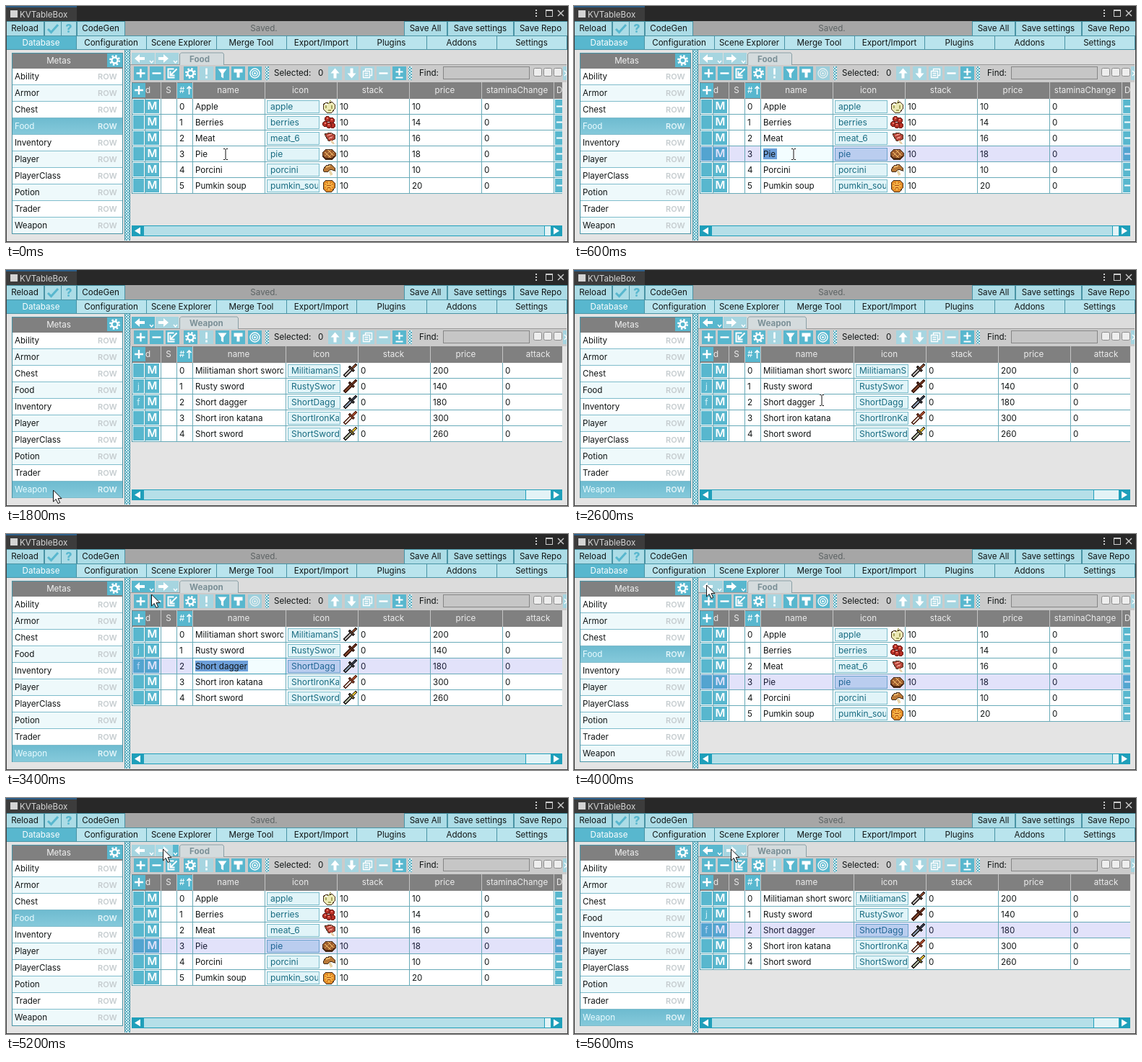
Recreate the animation shown at these times as an HTML page. Size 778 by 328 pixels, loop 5.8 s.

```html
<!DOCTYPE html>
<html lang="en">
<head>
<meta charset="utf-8">
<title>Table editor</title>
<style>
html, body { margin: 0; width: 100%; height: 100%; overflow: hidden; background: #e4e4e4; }
svg { display: block; }
text { font-family: Inter, "Open Sans", sans-serif; font-size: 11.6px; white-space: pre; }
.food, .weapon, .pie, .dagger, .pieEdit, .daggerEdit, .fade, .next, .hover, .beam, .arrow, #cursor {
  animation: 5800ms step-end infinite;
}
.food { animation-name: food; }
.weapon { animation-name: weapon; }
.pie { animation-name: pie; }
.dagger { animation-name: dagger; }
.pieEdit { animation-name: pieEdit; }
.daggerEdit { animation-name: daggerEdit; }
.fade { animation-name: fade; }
.next { animation-name: next; }
.hover { animation-name: hover; }
.beam { animation-name: beam; }
.arrow { animation-name: arrow; }
#cursor { animation-name: move; }
@keyframes food { 0%, 65.51% { opacity: 1 } 27.58%, 93.1%, 100% { opacity: 0 } }
@keyframes weapon { 0%, 65.51% { opacity: 0 } 27.58%, 93.1%, 100% { opacity: 1 } }
@keyframes pie { 0% { opacity: 0 } 6.89%, 100% { opacity: 1 } }
@keyframes dagger { 0% { opacity: 0 } 48.27%, 100% { opacity: 1 } }
@keyframes pieEdit { 0%, 27.58%, 100% { opacity: 0 } 6.89% { opacity: 1 } }
@keyframes daggerEdit { 0%, 65.51%, 100% { opacity: 0 } 48.27% { opacity: 1 } }
@keyframes fade { 0%, 27.58%, 65.51%, 100% { opacity: 0 } 6.89%, 48.27% { opacity: .55 } }
@keyframes next { 0%, 93.1%, 100% { opacity: 0 } 65.51% { opacity: 1 } }
@keyframes hover { 0%, 93.1%, 100% { opacity: 0 } 86.2% { opacity: 1 } }
@keyframes beam { 0%, 41.37% { opacity: 1 } 13.79%, 55.17%, 100% { opacity: 0 } }
@keyframes arrow { 0%, 41.37% { opacity: 0 } 13.79%, 55.17%, 100% { opacity: 1 } }
@keyframes move {
  0% { transform: translate(304px, 206px) }
  10.34% { transform: translate(304px, 206px); animation-timing-function: steps(4) }
  24.13% { transform: translate(65px, 306px) }
  31.03% { transform: translate(65px, 306px); animation-timing-function: steps(4) }
  44.82% { transform: translate(343px, 181px) }
  51.72% { transform: translate(343px, 181px); animation-timing-function: steps(2) }
  58.62% { transform: translate(201px, 84px) }
  62.06% { transform: translate(183px, 71px) }
  75.86% { transform: translate(183px, 71px); animation-timing-function: steps(3) }
  86.2%, 100% { transform: translate(217px, 71px) }
}
</style>
</head>
<body>
<svg id="stage" width="778" height="328" viewBox="0 0 778 328">
  <defs>
    <linearGradient id="chosen" x2="0" y2="1"><stop stop-color="#6ebbd0"/><stop offset="1" stop-color="#86cadb"/></linearGradient>
    <pattern id="dots" width="4" height="4" patternUnits="userSpaceOnUse">
      <path fill="#55aabd" d="M0 0h4v4h-4z"/><path fill="#d9f3f8" d="M0 0h2v2h-2zM2 2h2v2h-2z"/>
    </pattern>
  </defs>
</svg>
<script>
const TEAL = '#58b7ce', PALE = '#b9e4ed', DIM = '#a6d5e0', DEEP = '#1f9fba', EDGE = '#4a94a5';
const GRAY = '#808080', SHELL = '#3c3c3c', INK = '#101414';

const rect = (x, y, w, h, fill, stroke) => stroke
  ? `<rect x="${x + .5}" y="${y + .5}" width="${w - 1}" height="${h - 1}" fill="${fill}" stroke="${stroke}"/>`
  : `<rect x="${x}" y="${y}" width="${w}" height="${h}" fill="${fill}"/>`;
const text = (x, y, s, fill = INK, more = '') => `<text x="${x}" y="${y}" fill="${fill}" ${more}>${s}</text>`;
const mid = (x, y, s, fill, more = '') => text(x, y, s, fill, `text-anchor="middle" ${more}`);
const line = (d, color, w = 1) => `<path d="${d}" fill="none" stroke="${color}" stroke-width="${w}"/>`;
const group = (cls, s) => `<g class="${cls}">${s}</g>`;
const at = (x, y, s) => `<g transform="translate(${x} ${y})">${s}</g>`;
const clip = (x, y, w, h, s) => `<svg x="${x}" y="${y}" width="${w}" height="${h}" viewBox="${x} ${y} ${w} ${h}">${s}</svg>`;

// Glyphs are drawn around the centre of a button
const glyph = {
  plus: line('M-6 0H6M0-6V6', '#fff', 2.4),
  minus: line('M-6 0H6', '#fff', 2.4),
  edit: line('M3 6H-6V-6H2M6-6L-2 2M-3-3V3H3', '#fff', 2),
  gear: '<circle r="4" fill="none" stroke="#fff" stroke-width="2.4"/><circle r="6.2" fill="none" stroke="#fff" stroke-width="2.6" stroke-dasharray="2.4 2.47"/>',
  bang: line('M0-7V2M0 4V7', '#fff', 2.6),
  funnel: '<path d="M-6-6H6L1.6 0V7L-1.6 5V0Z" fill="#fff"/>',
  tee: '<path d="M-6-6H6V-1H2V6H-2V-1H-6Z" fill="#fff"/>',
  target: '<g fill="none" stroke="#fff" stroke-width="1.4"><circle r="6.5"/><circle r="3.6"/><circle r=".8"/></g>',
  up: '<path d="M0-7L6 0H2V7H-2V0H-6Z" fill="#fff"/>',
  down: '<path d="M0 7L6 0H2V-7H-2V0H-6Z" fill="#fff"/>',
  copy: line('M-3-3V-6H6V3H3M-6-3H3V6H-6ZM-4 0H1M-4 3H1', '#fff', 1.3),
  both: line('M-5-2H5M0-7V3M-5 6H5', '#fff', 2.2)
};
const button = (x, name, fill = TEAL, y = 84, w = 19) =>
  rect(x, y, w, 19, fill) + at(x + w / 2, y + 9.5, glyph[name]);

function frame() {
  let s = rect(0, 0, 778, 328, '#e4e4e4') + rect(0, 0, 778, 21, '#282828');
  s += rect(0, 0, 98, 21, SHELL) + rect(0, 0, 98, 2, '#2c5d87');
  s += rect(6, 6, 10, 10, '#d4d4d4') + text(19, 16, 'KVTableBox', '#d6d6d6');
  for (const y of [5, 9, 13]) s += rect(733, y, 2, 2, '#ccc');
  s += rect(747, 6, 10, 9, 'none', '#ccc') + rect(747, 5, 10, 2, '#ccc') + line('M764 6L772 14M772 6L764 14', '#ccc', 1.4);
  s += rect(0, 21, 778, 20, '#a6a6a6') + mid(357, 35, 'Saved.', '#5c6263');
  for (const [x, w, label] of [[0, 53, 'Reload'], [53, 24, ''], [76, 22, ''], [98, 67, 'CodeGen'],
    [551, 60, 'Save All'], [611, 92, 'Save settings'], [703, 75, 'Save Repo']])
    s += rect(x, 21, w, 21, '#acdce6', EDGE) + mid(x + w / 2 - .5, 35, label);
  s += line('M58 32L62.5 36.5L72 26', TEAL, 3) + mid(87, 37, '?', TEAL, 'style="font-size:16px;font-weight:800"');
  ['Database', 'Configuration', 'Scene Explorer', 'Merge Tool', 'Export/Import', 'Plugins', 'Addons', 'Settings']
    .forEach((label, i) => {
      s += rect(i * 97, 41, 98, 20, i ? PALE : TEAL, EDGE) + mid(i * 97 + 48.5, 55, label, i ? INK : '#fff');
    });
  s += rect(165, 61, 6, 265, 'url(#dots)') + line('M164.5 61V326M171.5 61V326', EDGE);
  return s + rect(0, 327, 778, 1, SHELL) + rect(0, 21, 1, 307, SHELL) + rect(777, 21, 1, 307, SHELL);
}

const metas = ['Ability', 'Armor', 'Chest', 'Food', 'Inventory', 'Player', 'PlayerClass', 'Potion', 'Trader', 'Weapon'];
function metaRow(i, on) {
  const y = 87 + i * 23;
  return rect(9, y, 152, 23, on ? 'url(#chosen)' : i % 2 ? '#eef9fb' : '#fff')
    + rect(9, y + 22, 152, 1, '#7fbccb')
    + text(12, y + 15, metas[i], on ? '#e9fbff' : INK)
    + text(127, y + 15, 'ROW', on ? '#e4f5f9' : '#c5cccf', 'style="font-size:11px;font-weight:600"');
}
const metaList = () => rect(8, 65, 154, 23, GRAY) + mid(73, 80, 'Metas', '#f2f2f2')
  + button(140, 'gear', TEAL, 66, 21) + metas.map((_, i) => metaRow(i)).join('')
  + rect(8, 65, 154, 252, 'none', EDGE);

function navButton(x, dir, on) {
  const arrow = `<path transform="scale(${dir} 1)" d="M7-2H0V-6L-7 0L0 6V2H7Z" fill="#fff"/>`;
  return rect(x, 65, 32, 16, on ? TEAL : DIM) + at(x + 11, 73, arrow)
    + line(`M${x + 25} 76L${x + 27.5} 79L${x + 30} 76`, '#fff', 1.4);
}

function toolbar() {
  let s = rect(172, 61, 604, 21, '#dcdcdc') + rect(172, 81, 604, 25, '#cbcbcb') + rect(172, 81, 604, 1, '#9a9a9a');
  const names = ['plus', 'minus', 'edit', 'gear', 'bang', 'funnel', 'tee', 'target', 'up', 'down', 'copy', 'minus', 'both'];
  [177, 199, 221, 246, 268, 290, 312, 335, 446, 469, 491, 513, 535].forEach((x, i) => {
    s += button(x, names[i], i === 4 || (i > 7 && i < 12) ? DIM : TEAL);
  });
  for (const x of [359, 557]) s += rect(x, 84, 5, 19, 'url(#dots)');
  s += group('fade', rect(335, 84, 19, 19, '#d3e3e7'));
  s += text(371, 97, 'Selected:') + text(432, 97, '0') + text(572, 97, 'Find:');
  s += rect(605, 84, 120, 18, '#c6c6c6', '#858585');
  for (const x of [730, 744, 758]) s += `<rect x="${x}.5" y="86.5" width="11" height="11" rx="2" fill="#eee" stroke="#8c8c8c"/>`;
  return s + clip(771, 84, 5, 19, rect(771, 84, 5, 19, DIM) + line('M773 90L780 97M780 90L773 97', '#fff', 1.5));
}

const sprite = (fill, d, extra) => `<path d="${d}" fill="${fill}" stroke="#45301f"/>${extra}`;
const foodArt = [
  sprite('#ece9b5', 'M7 4L10 6L14 3L18 7V13L14 18H7L2 13V7Z', line('M10 6L12 1M6 8V12M9 15H13M14 8V13', '#a7a65e', 1.5) + line('M5 7H8', '#fff', 2)),
  '<g fill="#b52f25" stroke="#641915"><circle cx="8" cy="5" r="3.7"/><circle cx="14" cy="7" r="3.7"/><circle cx="5" cy="12" r="3.7"/><circle cx="15" cy="14" r="3.7"/><circle cx="10" cy="14" r="3.7"/></g>' + line('M7 4H9M13 6H15M4 11H6M9 13H11', '#f0796b', 1.5),
  sprite('#b5463a', 'M4 4L12 2L18 5V11L13 14L9 13Z', line('M8 6L14 4M10 10L15 8', '#ef9888', 1.7) + line('M13 13L17 18', '#e9d1aa', 2.5)),
  sprite('#9b5a2c', 'M6 3H14L19 8V13L15 17H5L1 13V8Z', line('M4 7L14 16M8 4L17 12M4 13L13 4M8 16L17 7', '#e1a65c', 1.4) + line('M2 13L6 16H14L18 13', '#50270f', 1.5)),
  sprite('#b97938', 'M2 9L6 4L13 2L18 7V11L12 9L8 13L3 12Z', line('M11 11L14 17', '#e9d5a8', 4) + line('M6 6L12 4', '#e6b26a', 2)),
  sprite('#e08a27', 'M6 2H14L18 6V13L14 18H6L2 14V6Z', line('M5 6L15 14M5 14L15 6M10 4V16M4 10H16', '#f7b94c', 1.4) + line('M7 9H13M8 12H12', '#a84813', 1))
];
const sword = (blade, grip, outline = '#24201f') =>
  line('M2 18L13 7', outline, 5) + line('M3 17L12 8', blade, 2.4)
  + line('M13 7L19 1', outline, 4) + line('M13 7L18 2', grip, 1.8)
  + line('M9 4L16 11', outline, 3) + line('M10 5L15 10', grip, 1.4);

const tables = {
  food: {
    cols: [258, 358, 458, 558, 658, 758], heads: ['name', 'icon', 'stack', 'price', 'staminaChange'],
    rows: [['Apple', 'apple', 10, 10, 0], ['Berries', 'berries', 10, 14, 0], ['Meat', 'meat_6', 10, 16, 0],
      ['Pie', 'pie', 10, 18, 0], ['Porcini', 'porcini', 10, 10, 0], ['Pumkin soup', 'pumkin_soup', 10, 20, 0]],
    art: foodArt, marks: [], meta: 3, tab: 62, thumb: 556, pick: 3, cls: 'pie', sel: 19
  },
  weapon: {
    cols: [258, 387, 487, 587, 687, 787], heads: ['name', 'icon', 'stack', 'price', 'attack'],
    rows: [['Militiaman short sword', 'MilitiamanS', 0, 200, 0], ['Rusty sword', 'RustySwor', 0, 140, 0],
      ['Short dagger', 'ShortDagg', 0, 180, 0], ['Short iron katana', 'ShortIronKa', 0, 300, 0], ['Short sword', 'ShortSword', 0, 260, 0]],
    art: [sword('#b9b4b0', '#8a4a2e'), sword('#7d4026', '#6b321e', '#3a1c12'), sword('#8594a8', '#34394a'),
      sword('#e2dbd2', '#a3482a', '#54291c'), sword('#a9b39a', '#e0b92f')],
    marks: ['', 'j', 'f'], meta: 9, tab: 82, thumb: 530, pick: 2, cls: 'dagger', sel: 73
  }
};

function header({ cols, heads }) {
  const label = '#ececec';
  let s = rect(174, 106, 596, 23, GRAY) + text(193, 121, 'd', label) + mid(225, 121, 'S', label);
  s += rect(175, 107, 18, 20, TEAL) + at(184, 117, glyph.plus);
  s += rect(236, 107, 22, 21, TEAL) + text(240, 121, '#', '#fff') + line('M253.5 123V112M250.5 115L253.5 112L256.5 115', '#fff', 1.6);
  heads.forEach((h, i) => { s += mid((cols[i] + cols[i + 1]) / 2 - .5, 121, h, label); });
  s += text(762, 121, cols[5] < 770 ? 'D' : '', label);
  for (const x of [214, 236, ...cols]) s += rect(x, 106, 1, 23, '#c4c4c4');
  return s;
}

function row(t, i) {
  const [name, icon, ...nums] = t.rows[i], y = 129 + i * 22, b = y + 15, x = t.cols[1], picked = i === t.pick;
  let s = rect(174, y, 596, 22, '#fff') + rect(176, y + 1, 15, 19, TEAL) + mid(183.5, b, t.marks[i] || '', '#d9f4fa');
  s += rect(193, y + 1, 19, 19, TEAL) + mid(202.5, b, 'M', '#fff', 'style="font-size:15px;font-weight:600"');
  s += text(240, b, i) + clip(259, y, x - 262, 22, text(262, b, name));
  s += rect(x + 3, y + 2, 73, 18, '#e1f4f8', '#79bccb')
    + clip(x + 4, y + 2, 70, 18, text(x + 8, b, icon, '#176b80', 'style="font-size:12px"'));
  nums.forEach((n, k) => { s += text(t.cols[k + 2] + 4, b, n); });
  if (t.cols[5] < 770) s += rect(760, y + 1, 12, 19, TEAL) + line(`M762 ${y + 10.5}H770`, '#fff', 2);
  if (picked) s += group(t.cls, rect(174, y, 596, 22, 'rgba(60,60,220,.15)') + rect(x + 3, y + 2, 73, 18, 'rgba(60,110,190,.1)'));
  s += at(x + 79, y + 1, `<g shape-rendering="crispEdges">${t.art[i]}</g>`);
  for (const c of [192, 214, 236, ...t.cols]) s += rect(c, y, 1, 22, '#68aab8');
  s += rect(174, y + 21, 596, 1, '#68aab8');
  if (picked) s += group(t.cls + 'Edit', rect(258, y - 1, x - 257, 23, '#f3fdff', '#3f9db3')
    + rect(262, y + 3, t.sel, 15, '#6d9fd9') + text(262, b, name));
  return s;
}

function view(key) {
  const t = tables[key], weapon = key === 'weapon', w = t.tab;
  let s = metaRow(t.meta, true) + navButton(174, 1, weapon) + navButton(207, -1, false);
  if (!weapon) s += group('next', navButton(207, -1, true)) + group('hover', rect(207, 65, 24, 16, '#a9dae5')
    + at(218, 73, '<path d="M-7-2H0V-6L7 0L0 6V2H-7Z" fill="#fff"/>'));
  s += `<path d="M240.5 82V67L242.5 65H${238 + w}L${239.5 + w} 67V82" fill="#d4dbdd" stroke="#8a9fa5"/>`;
  s += text(254, 78, weapon ? 'Weapon' : 'Food', '#7b9097', 'font-weight="700"');
  const body = header(t) + t.rows.map((_, i) => row(t, i)).join('') + rect(174, 106, 1, 23 + 22 * t.rows.length, EDGE);
  s += clip(174, 106, 596, 200, body);
  s += rect(174, 305, 596, 15, '#e3f3f6', DEEP) + rect(190, 305, t.thumb, 15, '#b5dfe8', DEEP);
  for (const [x, d] of [[174, 1], [754, -1]])
    s += rect(x, 305, 16, 15, DEEP) + at(x + 8, 312.5, `<path transform="scale(${d} 1)" d="M-4 0L4-5V5Z" fill="#fff"/>`);
  return group(key, s);
}

const beam = 'M-3-7.5H-1L0-6.5L1-7.5H3M0-6.5V6.5M-3 7.5H-1L0 6.5L1 7.5H3';
const cursor = `<g id="cursor">
  <g class="beam">${line(beam, '#fff', 2.4)}${line(beam, '#111', 1)}</g>
  <path class="arrow" d="M.5 0V16L4.2 12.5L7 18.5L9.7 17.3L7 11.6H12Z" fill="#fff" stroke="#111"/></g>`;

document.getElementById('stage').insertAdjacentHTML('beforeend',
  frame() + metaList() + toolbar() + view('food') + view('weapon') + cursor);
</script>
</body>
</html>
```
